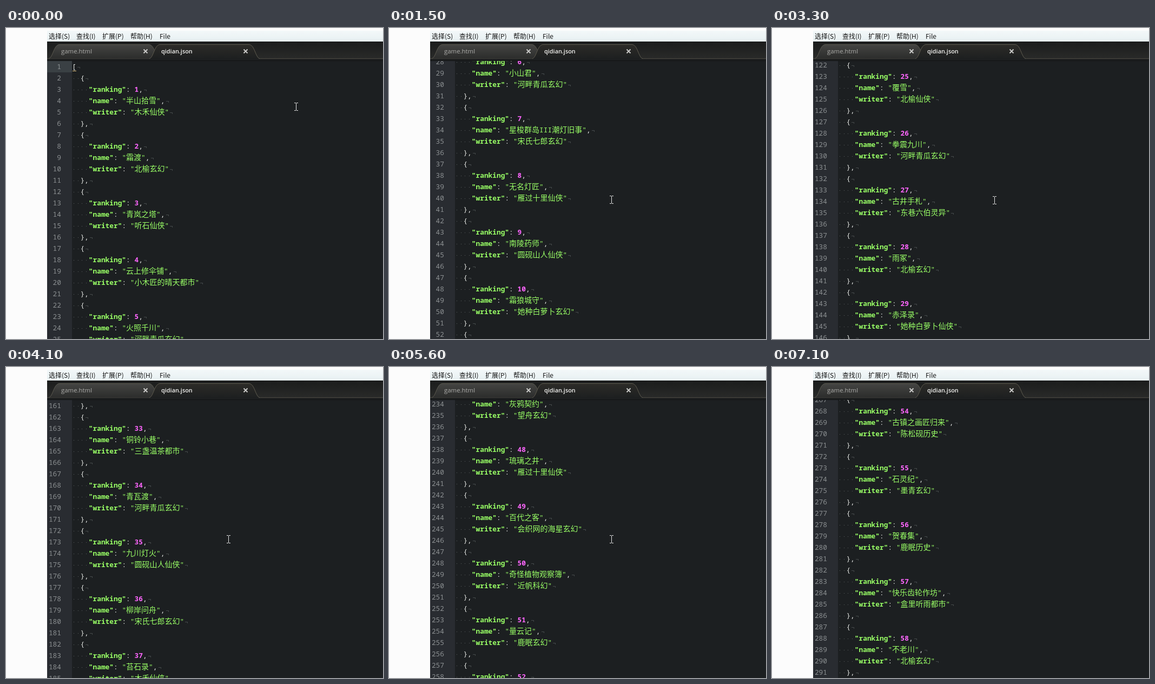
Animation of 697x575 px, one loop 7600 ms. Source, as an HTML page with a canvas:

```html
<!DOCTYPE html>
<html lang="zh">
<head>
<meta charset="utf-8">
<style>
  html, body { margin: 0; width: 100%; height: 100%; overflow: hidden; background: #fcfcfc; }
  canvas { display: block; }
</style>
</head>
<body>
<canvas id="stage" width="697" height="575"></canvas>
<script>
const ctx = document.getElementById('stage').getContext('2d');
const W = 697, H = 575, LOOP = 7600;
const LEFT = 76, GUTTER_END = 122, TOP = 61, ROW = 21, CELL = 7.7;
const MONO = '12.83px "Noto Sans Mono", "Noto Sans CJK SC", monospace';
const BOLD = '600 ' + MONO;
const CJK = '14px "Noto Sans CJK SC", "Noto Sans CJK", sans-serif';
const GREEN = '#9f6', PINK = '#f6f', PLAIN = '#e4e6e3', FAINT = '#44494a';

// Books keyed by the rank each run starts at; "title|writer and genre".
const runs = {
  1: `半山拾雪|木禾仙侠 霜渡|北榆玄幻 青岚之塔|听石仙侠 云上修伞铺|小木匠的晴天都市
    火照千川|河畔青瓜玄幻 小山君|河畔青瓜玄幻 星梭群岛III潮灯旧事|宋氏七郎玄幻
    无名灯匠|雁过十里仙侠 南陵药师|圆砚山人仙侠 霜狼城守|她种白萝卜玄幻`,
  14: `别惹这位铁匠|三禾奇幻 甜汤小掌柜|爱种花的鹿都市 衔石|她种白萝卜奇幻
    谁可量海|木禾仙侠 星梭群岛|宋氏七郎玄幻`,
  25: `覆雪|北榆仙侠 拳震九川|河畔青瓜玄幻 古井手札|东巷六伯灵异 雨冢|北榆玄幻 赤泽录|她种白萝卜仙侠`,
  38: `茶灵|宋氏七郎奇幻 归来晴朗年华|先生无琴都市 掌柜留步|爱唱歌的芋头都市
    妙手茶师|三盏温茶都市 拳灵|碧海青牛玄幻`,
  47: `灰鸦契约|望舟玄幻 琉璃之井|雁过十里仙侠 百代之客|会织网的海星玄幻
    奇怪植物观察簿|近帆科幻 量云记|鹿眠玄幻`,
  54: `古镇之画匠归来|陈松砚历史 石灵纪|墨青玄幻 贺春集|鹿眠历史 快乐齿轮作坊|盒里听雨都市 不老川|北榆玄幻`
};
const fillers = `柳岸问舟|宋氏七郎玄幻 苔石录|木禾仙侠 铜铃小巷|三盏温茶都市
  青瓦渡|河畔青瓜玄幻 九川灯火|圆砚山人仙侠`.split(/\s+/);

const books = Array.from({ length: 60 }, (_, i) => fillers[i % fillers.length]);
for (const [rank, text] of Object.entries(runs))
  text.split(/\s+/).forEach((book, i) => { books[+rank - 1 + i] = book; });

const lines = [{ indent: 0, mark: '[' }];
books.forEach((book, i) => {
  const [name, writer] = book.split('|');
  lines.push(
    { indent: 2, mark: '{' },
    { indent: 4, key: '"ranking"', number: String(i + 1), comma: true },
    { indent: 4, key: '"name"', string: name, comma: true },
    { indent: 4, key: '"writer"', string: writer },
    { indent: 2, mark: i < books.length - 1 ? '},' : '}' });
});
lines.push({ indent: 0, mark: ']' });

// Scroll offsets in px; each wheel burst lands in two hard steps.
const scrolls = [[0, 0], [600, 96], [1000, 288], [1100, 384], [1300, 432], [1400, 528], [1500, 576],
  [1600, 720], [1700, 864], [1800, 1008], [1900, 1104]];
function burst(time, end) {
  const from = scrolls[scrolls.length - 1][1];
  scrolls.push([time, Math.round(from + (end - from) * 5 / 6)], [time + 100, end]);
}
burst(2100, 1392);
burst(2400, 1680);
scrolls.push([2700, 1968]);
for (let i = 0; i < 7; i++) burst(2900 + i * 300, 2256 + i * 288);
burst(5000, 4296);
burst(5300, 4608);
burst(5600, 4954);
burst(5900, 5275);
burst(6200, 5597);

const pointer = [[0, 536, 145], [100, 470, 235], [200, 411, 317], [2900, 411, 318], [5700, 410, 318],
  [6800, 425, 300], [6900, 520, 205], [7000, 650, 102], [7100, -50, -50]];

const stepAt = (steps, t) => steps.filter(s => s[0] <= t).pop();

function text(str, x, y, font, color, align = 'left') {
  ctx.font = font;
  ctx.fillStyle = color;
  ctx.textAlign = align;
  ctx.fillText(str, x, y);
}

function box(x, y, w, h, color) {
  ctx.fillStyle = color;
  ctx.fillRect(x, y, w, h);
}

function shade(y0, y1, a, b) {
  const g = ctx.createLinearGradient(0, y0, 0, y1);
  g.addColorStop(0, a);
  g.addColorStop(1, b);
  return g;
}

function drawLine(line, index, y) {
  const base = y + 15;
  text(index + 1, 102, base, MONO, '#8b8f91', 'right');
  for (let i = 0; i < line.indent; i++) box(Math.round(GUTTER_END + i * CELL + 3), y + 11, 1, 1, '#5a5f60');

  let x = GUTTER_END + line.indent * CELL;
  const put = (str, font, color) => {
    text(str, x, base, font, color);
    x += str.length * CELL;
  };
  if (line.mark) put(line.mark, MONO, PLAIN);
  if (line.key) {
    put(line.key, BOLD, GREEN);
    put(': ', MONO, PLAIN);
  }
  if (line.number) put(line.number, BOLD, PINK);
  if (line.string) {
    put('"', MONO, GREEN);
    for (const part of line.string.match(/[A-Z]+|[^A-Z]+/g)) {
      if (/[A-Z]/.test(part)) put(part, MONO, GREEN);
      else {
        text(part, x, base, CJK, GREEN);
        x += part.length * 14;
      }
    }
    put('"', MONO, GREEN);
  }
  if (line.comma) put(',', MONO, PLAIN);
  const end = Math.round(x) + 2;
  box(end, y + 11, 5, 1, FAINT);
  box(end + 4, y + 11, 1, 3, FAINT);
}

function drawEditor(scroll) {
  box(LEFT, TOP, W - LEFT, H - TOP, '#1c1f21');
  box(LEFT, TOP, GUTTER_END - LEFT, H - TOP, '#292c31');
  ctx.save();
  ctx.beginPath();
  ctx.rect(LEFT, TOP, W - LEFT, H - TOP);
  ctx.clip();
  box(LEFT, TOP - scroll, GUTTER_END - LEFT, ROW, '#3a4044');
  const first = Math.floor(scroll / ROW);
  for (let i = first; i < first + 26 && i < lines.length; i++) drawLine(lines[i], i, TOP + i * ROW - scroll);
  box(GUTTER_END + 1, TOP + 18 - scroll, 7, 1, '#d8b878');
  ctx.restore();
}

function tab(left, right, fill, edge) {
  ctx.beginPath();
  ctx.moveTo(left, 56.5);
  ctx.bezierCurveTo(left + 8, 55, left + 9, 30.5, left + 20, 30.5);
  ctx.lineTo(right - 20, 30.5);
  ctx.bezierCurveTo(right - 9, 30.5, right - 8, 55, right, 56.5);
  ctx.fillStyle = fill;
  ctx.fill();
  ctx.strokeStyle = edge;
  ctx.lineWidth = 1;
  ctx.stroke();
}

function cross(x, y) {
  ctx.beginPath();
  ctx.moveTo(x - 3.5, y - 3.5);
  ctx.lineTo(x + 3.5, y + 3.5);
  ctx.moveTo(x + 3.5, y - 3.5);
  ctx.lineTo(x - 3.5, y + 3.5);
  ctx.strokeStyle = '#c8c8c6';
  ctx.lineWidth = 2;
  ctx.stroke();
}

function drawHeader() {
  box(LEFT, 5, W - LEFT, 20, shade(5, 25, '#f3f8f9', '#e7f0f2'));
  const menu = '12px "Noto Sans CJK SC", "Noto Sans CJK", sans-serif';
  [['选择(S)', 79], ['查找(I)', 130], ['扩展(P)', 178], ['帮助(H)', 230], ['File', 284]]
    .forEach(([label, x]) => text(label, x, 20, menu, '#161616'));

  box(LEFT, 25, W - LEFT, 36, shade(25, 57, '#1b1c1c', '#292a29'));
  box(LEFT, 57, W - LEFT, 4, '#1d1f20');
  box(LEFT, 56, W - LEFT, 1, '#4d4b43');
  box(LEFT, 60, W - LEFT, 1, '#111314');
  tab(79, 284, shade(30, 57, '#454543', '#2b2c2b'), '#5b594f');
  tab(265, 469, shade(30, 57, '#2d2c28', '#1d1f20'), '#5f5c50');
  box(267, 56, 200, 1, '#1d1f20');
  text('game.html', 102, 47, '11.4px "Open Sans", sans-serif', '#adadab');
  text('qidian.json', 287, 47, '600 10.9px "Open Sans", sans-serif', '#f4f4f2');
  cross(258, 43);
  cross(443, 43);
}

function drawPointer(x, y) {
  const color = '#e6e6e6';
  box(x, y - 6, 1, 13, color);
  for (const edge of [y - 7, y + 7]) {
    box(x - 3, edge, 3, 1, color);
    box(x + 1, edge, 3, 1, color);
  }
}

function draw(now) {
  const t = now % LOOP;
  box(0, 0, W, H, '#fcfcfc');
  drawEditor(stepAt(scrolls, t)[1]);
  drawHeader();
  const [, x, y] = stepAt(pointer, t);
  drawPointer(x, y);
}

const start = performance.now();
function frame() {
  draw(performance.now() - start);
  requestAnimationFrame(frame);
}
frame();
</script>
</body>
</html>
```
